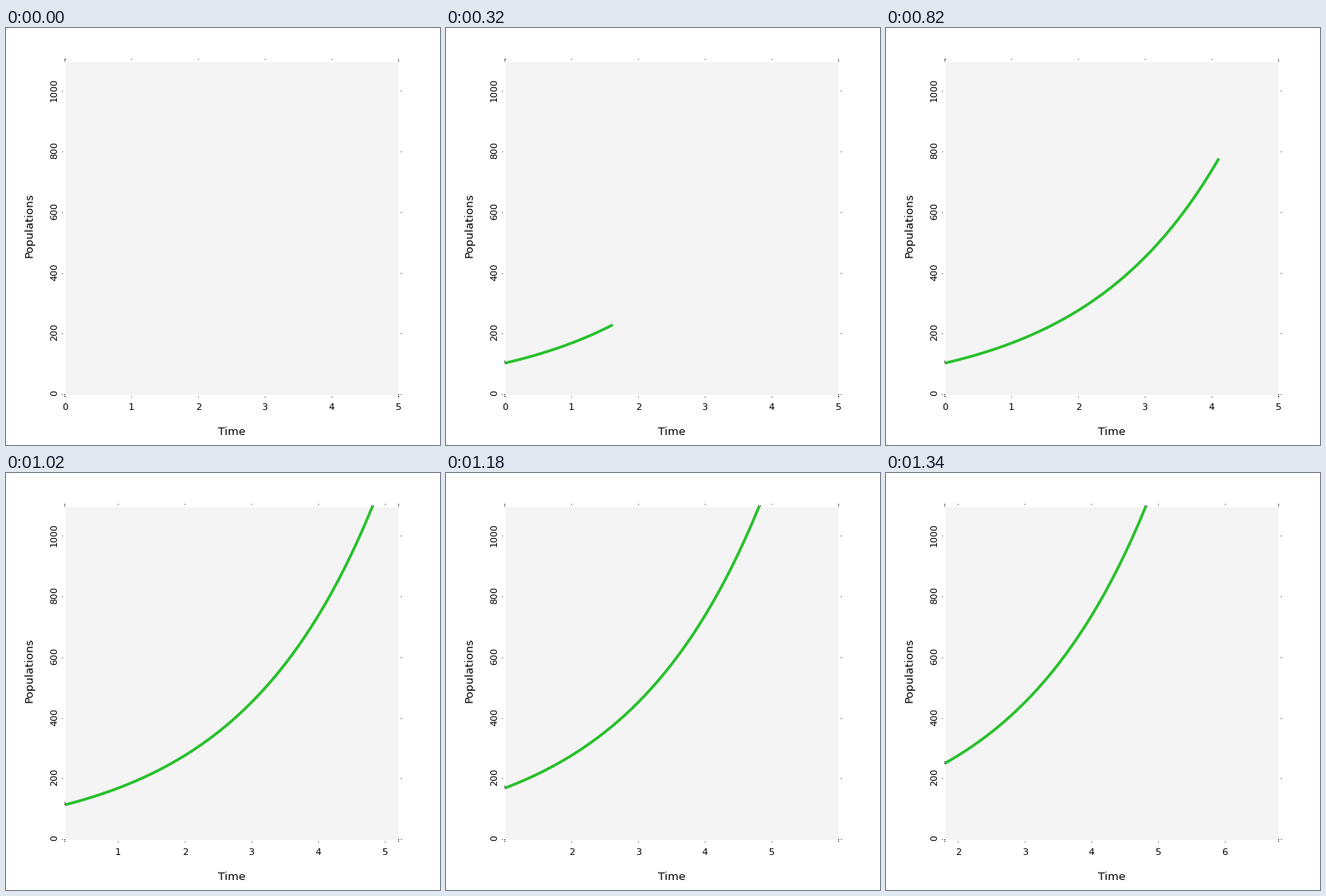
Animation, 520 px wide and 500 px high, one loop 1360 ms. Source, as a matplotlib script:

```python
import numpy as np
import matplotlib.pyplot as plt
from matplotlib.animation import FuncAnimation
from matplotlib.patches import Rectangle

W, H, DPI = 520, 500, 80
FRAMES, INTERVAL = 68, 20
LEFT, TOP, WIDTH, HEIGHT = 70.5, 40, 399.4, 400
BOTTOM = TOP + HEIGHT
SPAN, Y_MAX = 5, 1100
STEP = 0.1

plt.rcParams["font.family"] = "DejaVu Sans"
fig = plt.figure(figsize=(W / DPI, H / DPI), dpi=DPI, facecolor="white")
ax = fig.add_axes([0, 0, 1, 1])
ax.set_xlim(0, W)
ax.set_ylim(H, 0)
ax.axis("off")


def x_pix(t, start):
    return LEFT + (t - start) * WIDTH / SPAN


def y_pix(pop):
    return BOTTOM - pop * HEIGHT / Y_MAX


def label(x, y, text, size, rotation=0):
    return ax.text(x, y, text, fontsize=size, rotation=rotation, ha="center",
                   va="baseline", rotation_mode="anchor", color="black")


def dots(color, points=()):
    xs, ys = zip(*points) if points else ((), ())
    return ax.plot(xs, ys, ",", color=color, zorder=4)[0]


def set_points(artist, points):
    artist.set_data([p[0] for p in points], [p[1] for p in points])


ax.add_patch(Rectangle((71, 41), 399, 399, facecolor="#f4f4f4", lw=0))
clip = Rectangle((LEFT, TOP), WIDTH, HEIGHT, transform=ax.transData)
curve, = ax.plot([], [], color="#27c02b", lw=3, zorder=3)
curve.set_clip_path(clip)

label(270, 488, "Time", 12)
label(31.5, 236.5, "Populations", 12, 90)
side_ticks = []
for value in range(0, Y_MAX, 200):
    y = y_pix(value)
    label(61, y - 2.5, str(value), 10, 90)
    side_ticks += [(67, y), (473, y)]
dots("#555555", side_ticks)
corners = [(x, y) for x in (70, 470) for y in (38, 40, 440, 442)]
dots("black", corners)

x_labels = [label(0, 458.5, str(n), 10) for n in range(7)]
x_ticks = dots("#555555")
crossings = dots("black")


def draw(i):
    steps = np.arange(i + 1)
    shift = max(0, i - 49)
    start = shift * STEP
    xs = x_pix(steps * STEP, start)
    ys = y_pix(100 * 1.05 ** (steps + 1))
    curve.set_data(xs, ys)
    curve.set_visible(i > 0)

    ticks = []
    for n, text in enumerate(x_labels):
        shown = shift < 10 * n < shift + 50 or (shift == 0 and n in (0, 5))
        text.set_visible(shown)
        if shown:
            x = x_pix(n, start)
            text.set_x(x)
            ticks += [(x, 38), (x, 443)]
    set_points(x_ticks, ticks)

    # dark specks where the curve meets the plot border
    specks = []
    if i > 0:
        y = ys[shift] - 0.5
        specks += [(70, y - 1), (70, y + 1)]
    if ys[-1] < TOP:
        x = x_pix(STEP * (np.log(Y_MAX / 100) / np.log(1.05) - 1), start)
        specks += [(x - 1.5, TOP), (x + 0.5, TOP)]
    set_points(crossings, specks)
    return [curve, x_ticks, crossings, *x_labels]


anim = FuncAnimation(fig, draw, frames=FRAMES, interval=INTERVAL,
                     init_func=lambda: draw(0), repeat=True, repeat_delay=0)
plt.show()
```
